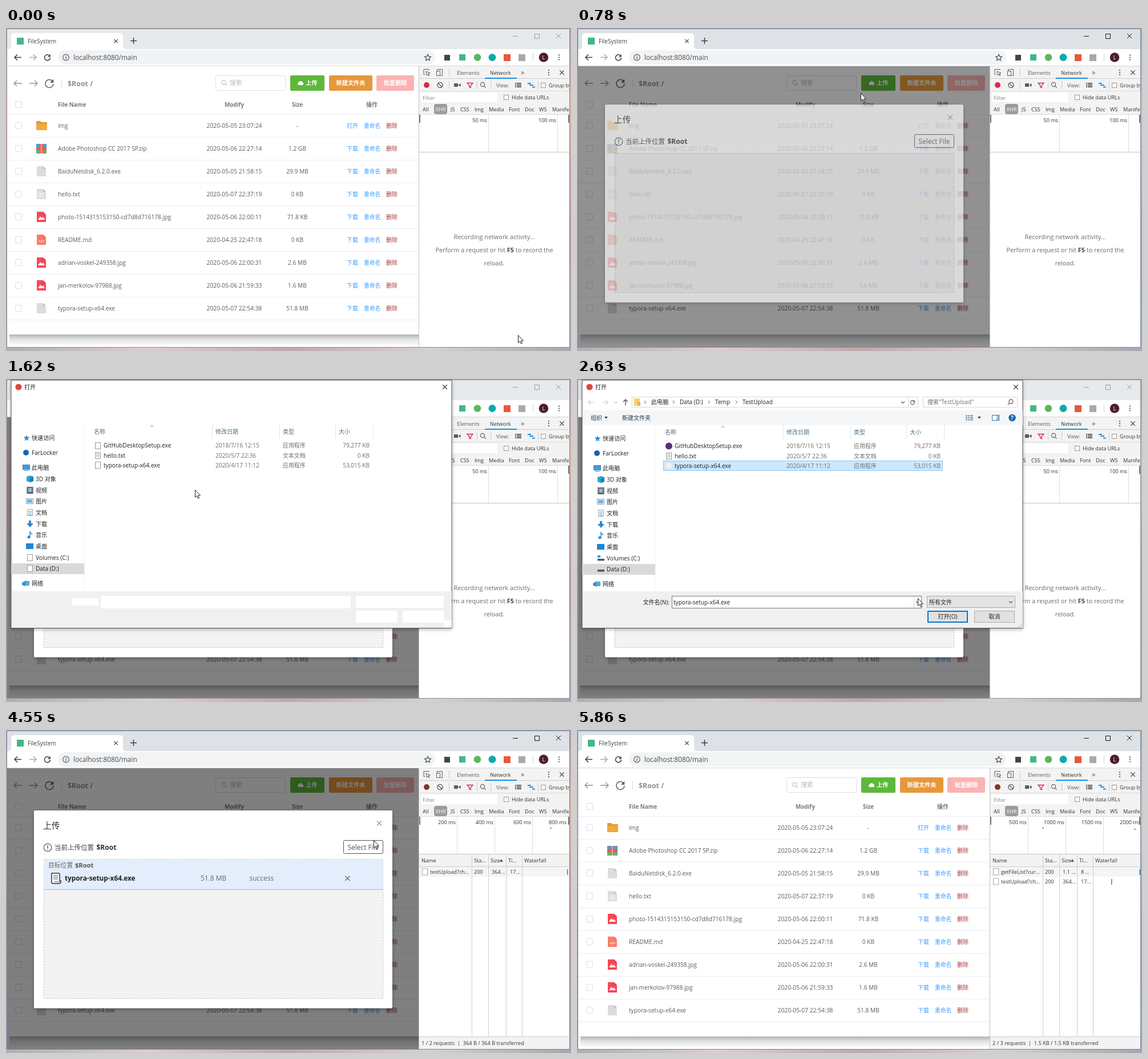
An HTML page for the animation above (5.95 s loop, 990x566 px).

```html
<!DOCTYPE html>
<html lang="zh">
<head>
<meta charset="utf-8">
<title>FileSystem</title>
<style>
html, body { margin: 0; width: 100%; height: 100%; overflow: hidden; background: #b9b2b6; }
svg { display: block; width: 100vw; height: 100vh; }
text { font-family: 'Open Sans', 'Noto Sans CJK SC', 'Noto Sans CJK', sans-serif; white-space: pre; }
</style>
</head>
<body>
<svg id="stage" viewBox="0 0 990 566" preserveAspectRatio="none"></svg>
<script>
const BOLD = 'font-weight="700"', MID = 'text-anchor="middle"', END = 'text-anchor="end"';
const text = (x, y, s, c = '#595c61', size = 10.2, extra = '') =>
  `<text x="${x}" y="${y}" fill="${c}" font-size="${size}" ${extra}>${s}</text>`;
const rect = (x, y, w, h, fill, extra = '') =>
  `<rect x="${x}" y="${y}" width="${w}" height="${h}" fill="${fill}" ${extra}/>`;
const box = (x, y, w, h, stroke, fill = '#fff', extra = '') =>
  rect(x + .5, y + .5, w - 1, h - 1, fill, `stroke="${stroke}" ${extra}`);
const path = (d, stroke, w = 1, fill = 'none', extra = '') =>
  `<path d="${d}" stroke="${stroke}" stroke-width="${w}" fill="${fill}" ${extra}/>`;
const disc = (x, y, r, fill, extra = '') => `<circle cx="${x}" cy="${y}" r="${r}" fill="${fill}" ${extra}/>`;
const ring = (x, y, r, stroke, w = 1) => disc(x, y, r, 'none', `stroke="${stroke}" stroke-width="${w}"`);
const cross = (x, y, r, c, w = 1) => path(`M${x - r} ${y - r}l${2 * r} ${2 * r}m0 ${-2 * r}l${-2 * r} ${2 * r}`, c, w);
const hline = (x, y, w, c) => rect(x, y, w, 1, c);
const vline = (x, y, h, c) => rect(x, y, 1, h, c);
const lens = (x, y, c, dir = 1) => ring(x, y, 3.6, c, 1.1) + path(`M${x + dir * 2.6} ${y + 2.6}l${dir * 3} 3`, c, 1.3);
const arrow = (x, y, len, c, dir, h = 5, w = 1.4) =>
  path(`M${x} ${y}h${dir * len}M${x + dir * h} ${y - h}l${-dir * h} ${h}l${dir * h} ${h}`, c, w);
const head = (x, y, len, c, dir, h = 5, w = 1.4) => {
  const tip = x + dir * len;
  return path(`M${x} ${y}H${tip}M${tip - dir * h} ${y - h}L${tip} ${y}l${-dir * h} ${h}`, c, w);
};
const dots = (x, y) => [-4, 0, 4].map(d => disc(x, y + d, 1.1, '#444')).join('');
const group = (id, body, extra = '') => `<g id="${id}" ${extra}>${body}</g>`;
const reload = (x, y, r, c, w) =>
  path(`M${x + r * .75} ${y - r * .6}A${r} ${r} 0 1 0 ${x + r} ${y + r * .1}`, c, w) +
  path(`M${x + r} ${y - r}v${r * .8}h${-r * .8}z`, c, .5, c);

const defs = `<defs>
<linearGradient id="wall" x2="0" y2="1"><stop stop-color="#aaa2a7"/><stop offset=".25" stop-color="#d8b3a8"/>
<stop offset=".6" stop-color="#b99a9c"/><stop offset="1" stop-color="#a9a6b2"/></linearGradient>
<linearGradient id="floor"><stop stop-color="#b3adb5"/><stop offset=".25" stop-color="#d9cfd0"/>
<stop offset=".5" stop-color="#c0a9aa"/><stop offset=".75" stop-color="#d6d0d5"/><stop offset="1" stop-color="#aaa5ae"/></linearGradient>
<linearGradient id="under" x2="0" y2="1"><stop stop-color="#b4b4b4"/><stop offset=".45" stop-color="#e2e2e2"/>
<stop offset="1" stop-color="#fcfcfc"/></linearGradient>
<filter id="shade" x="-5%" y="-5%" width="110%" height="115%"><feDropShadow dx="0" dy="2" stdDeviation="3" flood-opacity=".3"/></filter>
<clipPath id="win"><rect x="2" y="2" width="985" height="557"/></clipPath></defs>`;

function chrome() {
  const ink = '#3c4043';
  return rect(2, 2, 985, 557, '#fff') + rect(2, 2, 985, 35, '#e7eaed', 'id="strip"') +
    path('M3 37q6 0 6-6V15q0-6 6-6H199q6 0 6 6V31q0 6 6 6z', 'none', 0, '#fff') +
    rect(19, 17, 12, 12, '#41b883') + text(38, 27, 'FileSystem', ink, 10.1) + cross(192.5, 23, 3.2, ink, 1.2) +
    path('M218 22.5h11M223.5 17v11', ink, 1.5) +
    group('controls', path('M888 14.5h9M926.5 10.5h8v8h-8zM964 10l8 8m0-8l-8 8', 'currentColor')) +
    arrow(15, 51.5, 12, ink, 1, 5, 1.6) + head(41, 51.5, 12, '#a9abae', 1, 5, 1.6) + reload(72.5, 51.5, 5, ink, 1.6) +
    rect(91, 39, 661, 25, '#f1f3f4', 'rx="12.5"') + ring(105, 51.5, 5.3, '#5f6368', 1.2) +
    path('M105 48v1.4M105 50.6v3.8', '#5f6368', 1.4) + text(118, 55.5, 'localhost:8080/main', '#4a4d51', 11.8) +
    path('M739 46.3l1.6 3.6 3.9.4-2.9 2.6.8 3.8-3.4-2-3.4 2 .8-3.8-2.9-2.6 3.9-.4z', ink, 1.1) +
    rect(768, 47, 10, 10, '#444') + rect(794, 46, 11, 11, '#41b883') + disc(826, 51.5, 6.3, '#5bb75b') +
    disc(852, 51.5, 6.5, '#10a9a9') + rect(872, 46, 12, 12, '#e8573c') + rect(898, 46, 12, 12, '#a9a9a9') +
    vline(923, 44, 15, '#d5d7da') + disc(942, 51.5, 8.3, '#4b1f2b') + text(942, 55, 'L', '#fff', 9.5, MID) + dots(969, 51.5) +
    hline(2, 66, 985, '#d4d6d9');
}

const sheet = (y, c) => path(`M54 ${y - 9}h11l5 5v13h-16z`, 'none', 0, c) + path(`M65 ${y - 9}v5h5z`, 'none', 0, '#0002');
const icons = {
  dir: y => path(`M53 ${y - 7}q0-1 1-1h6l2 2h9q1 0 1 1v12q0 1-1 1h-17q-1 0-1-1z`, 'none', 0, '#e5982f') + rect(53, y - 3, 19, 11, '#f0a93f', 'rx="1"'),
  zip: y => rect(53, y - 8, 18, 6, '#4e9bd0') + rect(53, y - 2, 18, 5, '#e9584e') + rect(53, y + 3, 18, 6, '#57b27c') +
    rect(59, y - 8, 6, 17, '#f0625a') + path(`M62 ${y - 8}v17`, '#f6d9a0', 2, 'none', 'stroke-dasharray="1.5 1.5"'),
  exe: y => sheet(y, '#dcdcdc'),
  txt: y => sheet(y, '#dcdcdc') + path(`M57 ${y - 1}h10m-10 3h10m-10 3h10`, '#fff', 1.2),
  jpg: y => sheet(y, '#fa4655') + path(`M56 ${y + 5}l4-6 3 3 2-2 3 5z`, 'none', 0, '#fff'),
  md: y => sheet(y, '#fb7b66') + text(62, y + 4.5, '&lt;/&gt;', '#fff', 6.5, MID + ' ' + BOLD)
};
const files = [
  ['dir', 'img', '05-05 23:07:24', '-'],
  ['zip', 'Adobe Photoshop CC 2017 SP.zip', '05-06 22:27:14', '1.2 GB'],
  ['exe', 'BaiduNetdisk_6.2.0.exe', '05-05 21:58:15', '29.9 MB'],
  ['txt', 'hello.txt', '05-07 22:37:19', '0 KB'],
  ['jpg', 'photo-1514315153150-cd7d8d716178.jpg', '05-06 22:00:11', '71.8 KB'],
  ['md', 'README.md', '04-25 22:47:18', '0 KB'],
  ['jpg', 'adrian-voskel-249358.jpg', '05-06 22:00:31', '2.6 MB'],
  ['jpg', 'jan-merkolov-97988.jpg', '05-06 21:59:33', '1.6 MB'],
  ['exe', 'typora-setup-x64.exe', '05-07 22:54:38', '51.8 MB']
];

function page() {
  const check = y => box(16, y - 6, 12, 12, '#dcdfe6', '#fff', 'rx="1.5"');
  const title = '#77797f', strong = MID + ' ' + BOLD;
  let s = rect(2, 67, 721, 492, '#fdfdfd') + rect(6, 537, 717, 19, 'url(#under)') + rect(3, 67, 720, 470, '#fff') +
    arrow(14, 97, 14, '#909399', 1) + head(41, 97, 14, '#909399', 1) + reload(76, 97, 7, '#5a5d62', 1.5) +
    vline(97, 89, 16, '#dcdfe6') + text(108, 101.5, '$Root /', '#8d9096', 12.4, BOLD) +
    box(367, 83, 123, 27, '#dcdfe6', '#fff', 'rx="3"') + lens(381.5, 95.5, '#b9bdc5') + text(392, 100, '搜索', '#b4b8bf', 10.8) +
    rect(498, 83, 60, 27, '#5db83a', 'rx="2"') + rect(566, 83, 76, 27, '#e6983c', 'rx="2"') + rect(649, 83, 66, 27, '#fab3b3', 'rx="2"') +
    path('M513 100a2.6 2.6 0 0 1 .2-5a3.2 3.2 0 0 1 6 0a2.6 2.6 0 0 1 .3 5z', 'none', 0, '#fff') +
    text(525, 100.2, '上传', '#fff', 10.2, BOLD) + text(604, 100.2, '新建文件夹', '#fff', 10.2, strong) + text(682, 100.2, '批量删除', '#fff', 10.2, strong) +
    check(134) + text(91, 137.5, 'File Name', title, 9.9, BOLD) + text(400, 137.5, 'Modify', title, 9.9, strong) +
    text(510.5, 137.5, 'Size', title, 9.9, strong) + text(641, 137.5, '操作', title, 10, strong) + hline(3, 151, 720, '#ebeef5');
  files.forEach(([kind, name, date, size], k) => {
    const y = 171 + 40 * k, b = y + 3.7;
    s += check(y) + icons[kind](y) + text(91, b, name) + text(400, b, '2020-' + date, undefined, 10.25, MID) +
      text(510.5, b, size, undefined, 10.2, MID) + text(597, b, k ? '下载' : '打开', '#409eff', 10) +
      text(627, b, '重命名', '#409eff', 9.8) + text(666, b, '删除', '#aa383c', 10) + hline(3, y + 20, 720, '#ebeef5');
  });
  return s;
}

const G = '#5a5a5a', D = '#333', Z = 9.2;
const ruler = (marks, cap) => marks.map(([x, s]) => vline(x, 152, 65, '#ddd') + text(x - 2, 165, s, D, Z, END)).join('') + (cap || '');

function devtools() {
  const bar = '#f3f3f3', sep = '#ccc';
  const types = [['All', 730], ['JS', 779], ['CSS', 796], ['Img', 821], ['Media', 846], ['Font', 881], ['Doc', 909], ['WS', 934], ['Manifest', 957]];
  const row = (y, name, size, time, x) => box(729, y - 9.5, 10, 12, '#aaa') + text(743, y, name, D, Z) + text(820, y, '200', D, Z) +
    text(851, y, size, D, Z) + text(883, y, time, D, Z) + rect(x, y - 8, 1.6, 10, '#2a93cf');
  const status = s => text(728, 552, s, D, Z);
  const upload = 'testUpload?ch...';
  return rect(723, 67, 264, 492, '#fff') + rect(724, 67, 263, 84, bar) + vline(723, 67, 492, '#c4c4c4') + hline(724, 88, 263, sep) +
    path('M741 74v-1.5h-9v9h2M736 76l7 3-3 1.2 2 3-1 .7-2-3-2 2z', G) + path('M755.5 75v-2.5h9v11h-3M754.5 75.5h6v8h-6z', G) +
    vline(776, 71, 14, sep) + text(790, 81.5, 'Elements', G, Z) + text(848, 81.5, 'Network', D, Z) + rect(839, 87, 56, 2, '#1a8fe8') +
    text(902, 82, '»', G, 13) + dots(951, 78) + cross(974, 78, 3.7, G, 1.4) +
    disc(737, 100, 5, '#d92b45', 'id="rec"') + ring(760.5, 100, 4.6, G, 1.4) + path('M757.4 97l6.2 6', G, 1.4) + vline(776, 93, 14, sep) +
    path('M785 97h7v6h-7zM792.5 100l4-3v6z', 'none', 0, G) + path('M808 96.5h10l-3.8 4.2v4l-2.4-1.2v-2.8z', '#d92b45', 1.3) + vline(825, 93, 14, sep) +
    lens(835, 99, G) + vline(849, 93, 14, sep) + text(859, 103.5, 'View:', G, Z) + path('M892 97h2m1 0h8m-11 3h2m1 0h8m-11 3h2m1 0h8', G, 2) +
    path('M914 97h6m-3 3h7m-2 3.5h5', '#1a8fe8', 2) + vline(932, 93, 14, sep) + box(937, 96, 9, 9, '#999') + text(951, 103.5, 'Group by frame', D, Z) +
    hline(724, 110, 263, '#ddd') + rect(727, 113, 134, 17, '#fff') + text(730, 125.5, 'Filter', '#858585', Z) + box(872, 117, 9, 9, '#999') +
    text(886, 125, 'Hide data URLs', D, Z) + rect(750, 133, 23, 18, '#9b9b9b', 'rx="4"') + text(761.5, 145.5, 'XHR', '#fff', Z, MID) +
    types.map(([s, x]) => text(x, 145.5, s, D, Z)).join('') + hline(724, 151, 263, '#ddd') + hline(724, 217, 263, '#c4c4c4') +
    group('scale0', ruler([[845, '50 ms'], [966, '100 ms']])) +
    group('scale1', ruler([[790, '200 ms'], [856, '400 ms'], [922, '600 ms']], text(951, 165, '800 ms', D, Z) + rect(953, 171, 3, 1.5, '#1b9aaa'))) +
    group('scale2', ruler([[790, '500 ms'], [856, '1000 ms'], [922, '1500 ms']],
      text(951, 165, '2000 ms', D, Z) + rect(815, 171, 3, 1.5, '#1b9aaa') + rect(976, 173, 3, 1.5, '#1b9aaa'))) +
    rect(724, 152, 2, 14, '#777') + rect(985, 152, 2, 14, '#777') +
    group('idle', text(855.5, 370.4, 'Recording network activity...', '#6a6a6a', 10.9, MID) +
      text(855.5, 393.2, 'Perform a request or hit <tspan font-weight="700" fill="#444">F5</tspan> to record the', '#6a6a6a', 10.9, MID) +
      text(855.5, 416, 'reload.', '#6a6a6a', 10.9, MID)) +
    group('grid', rect(724, 218, 263, 21, bar) + rect(724, 240, 263, 17, '#f5f5f5') + hline(724, 239, 263, sep) +
      [816, 845, 876, 904].map(x => vline(x, 218, 319, '#ccc')).join('') + rect(724, 537, 263, 22, bar) + hline(724, 537, 263, sep) +
      [['Name', 728], ['Sta...', 820], ['Size', 849], ['Ti...', 880], ['Waterfall', 908]].map(([s, x]) => text(x, 232, s, D, Z)).join('') +
      path('M865 231l3-5 3 5z', 'none', 0, G)) +
    group('net1', status('0 / 1 requests  |  0 B / 0 B transferred')) +
    group('net2', row(252, upload, '364...', '17...', 983) + status('1 / 2 requests  |  364 B / 364 B transferred')) +
    group('net3', row(252, 'getFileList?cur...', '1.1 ...', '8 ...', 985.4) + row(269, upload, '364...', '17...', 936) +
      status('2 / 3 requests  |  1.5 KB / 1.5 KB transferred'));
}

function uploader() {
  return rect(49, 141, 628, 346.5, '#fff', 'rx="2" filter="url(#shade)"') + text(65, 172.5, '上传', '#303133', 14.8) +
    group('shut', cross(654, 163.5, 4, 'currentColor', 1.1)) + ring(73, 206, 6.8, '#444', 1.1) + path('M73 202v5M73 208.5v1.5', '#444', 1.3) +
    text(85, 209.5, '当前上传位置', '#444', 11.5) + text(158.5, 209.5, '$Root', '#303133', 12, BOLD) +
    box(591, 193, 70, 24, '#555', '#fff', 'rx="2"') + text(626, 209.5, 'Select File', '#555', 12, MID) +
    box(66, 226, 595, 245, '#c2c2c2', '#f3f3f3', 'stroke-dasharray="3 2"') +
    group('item', rect(66.5, 226.5, 594, 53, '#e3edfb', 'id="done"') + text(74, 240.5, '目标位置', '#666', 10.8) +
      text(121, 240.5, '$Root', '#555', 11.1, BOLD) + hline(66, 279, 595, '#b9b9b9') +
      path('M80 251h12q2 0 2 2v11h2v2q0 3-3 3h-11q-2 0-2-2z', '#333', 1.5, '#fff') + path('M83 255h8m-8 3h8m-8 3h8M84 266h11', '#555') +
      text(103, 264, 'typora-setup-x64.exe', '#222', 11.8, BOLD) + text(341, 264, '51.8 MB', '#666', 11.9) +
      text(426.5, 264, '', '#666', 12, 'id="state"') + group('drop', cross(598.5, 260, 4, '#666', 1.3)));
}

function picker() {
  const side = [[104, '快速访问', '#2f8fd8'], [130, 'FarLocker', '#1464b4'], [156, '此电脑', '#3f9be0'], [176, '3D 对象', '#2aa6d8'],
    [196, '视频', '#56606a'], [215, '图片', '#6fb3e0'], [235, '文档', '#8aa9c4'], [255, '下载', '#2f86d6'], [274, '音乐', '#2f86d6'],
    [294, '桌面', '#1c87d8'], [314, 'Volumes (C:)', 0], [333, 'Data (D:)', 0], [359, '网络', '#3d8fcd']];
  const glyph = (n, y, c) => [
    () => path(`M36 ${y - 5}l1.4 3.6 4 .2-3 2.6 1 3.8-3.4-2-3.4 2 1-3.8-3-2.6 4-.2z`, 'none', 0, c),
    () => disc(35, y, 5, c),
    () => box(29, y - 5, 13, 9, '#4a7da8', c) + hline(31, y + 5, 9, '#4a7da8'),
    () => path(`M36 ${y - 4}l6-2 6 2v8l-6 2-6-2z`, 'none', 0, c) + path(`M42 ${y - 1}l6-3v8l-6 2z`, 'none', 0, '#1d7fae'),
    () => rect(36, y - 6, 12, 12, c) + path(`M37 ${y - 5}v10m10-10v10`, '#fff', 1, 'none', 'stroke-dasharray="1.5 1.5"') + rect(39, y - 4, 6, 7, '#9fb8c9'),
    () => box(35, y - 5, 13, 10, '#8aa0b2') + rect(37, y - 3, 9, 6, c),
    () => box(37, y - 6, 10, 12, c) + path(`M39 ${y - 2}h6m-6 3h6m-6 3h6`, '#4b8fc5'),
    () => path(`M40 ${y - 6}h4v5h4l-6 7-6-7h4z`, 'none', 0, c),
    () => disc(40, y + 4, 2.5, c) + path(`M42 ${y + 4}v-10q0 3 4 5`, c, 1.5),
    () => rect(35, y - 5, 13, 10, c),
    () => '', () => '',
    () => path(`M28 ${y - 1}l7-4v10l-7-2z`, 'none', 0, c) + rect(34, y - 4, 7, 8, '#5aa9de')
  ][n]();
  const K = '#222', W = '#6d6d6d', H = '#4d7185';
  const list = [['GitHubDesktopSetup.exe', '2018/7/16 12:15', '应用程序', '79,277 KB'],
    ['hello.txt', '2020/5/7 22:36', '文本文档', '0 KB'], ['typora-setup-x64.exe', '2020/4/17 11:12', '应用程序', '53,015 KB']];
  const crumb = [['此电脑', 130], ['Data (D:)', 180], ['Temp', 242], ['TestUpload', 290]];
  const chev = (x, y, c) => path(`M${x - 3} ${y - 1.5}l3 3 3-3`, c, 1.1);
  const blank = y => box(156, y - 6, 10, 12, '#999');
  let body = rect(9, 324, 128, 19, '#d9d9d9') + side.map(([y, s, c], n) =>
    glyph(n, y, c) + text(n < 3 || n == 12 ? 45 : 52, y + 3.6, s, K, 10.1)).join('');
  body += rect(151.5, 143.5, 489, 17, '#cce8ff', 'id="pick" stroke="#90c8f0"');
  body += [['名称', 154], ['修改日期', 367], ['类型', 485], ['大小', 583]].map(([s, x]) => text(x, 96.5, s, H, 10)).join('') +
    [361, 479, 577, 643].map(x => vline(x, 81, 24, '#e3e3e3')).join('') + path('M252.5 85l3-3 3 3', '#777');
  list.forEach(([name, date, kind, size], k) => {
    const y = 121.4 + 17.3 * k;
    body += text(171, y, name, K, 10.1) + text(367, y, date, W) + text(485, y, kind, W, 9.9) + text(637, y, size, W, 10.1, END);
  });
  body += blank(135) + path('M158 132h6m-6 2.5h6m-6 2.5h6', '#888', .8) +
    group('plain', blank(118) + blank(152) + box(37, 308, 10, 12, '#999') + box(37, 327, 10, 12, '#999')) +
    group('rich', disc(161, 117.5, 6, '#5b2a78') + rect(156.5, 147.5, 9, 9, '#f2f2f2') +
      [314, 333].map(y => rect(36, y + 1, 12, 3.5, '#555')).join('') + rect(36, 309, 5, 4, '#2f9be0'));
  const ready = arrow(20, 41, 10, '#ccc', 1, 3.5, 1.2) + head(44, 41, 10, '#ccc', 1, 3.5, 1.2) + chev(68, 41, '#ccc') +
    path('M85 46v-10m-4 4l4-4 4 4', '#555', 1.4) + box(96, 31, 502, 19, '#d9d9d9') + rect(100, 34, 10, 13, '#f7cf72') + rect(106, 40, 5, 7, '#eab545') +
    crumb.map(([s, x]) => path(`M${x - 12} 38l2.5 2.5-2.5 2.5`, '#555') + text(x, 44, s, K, 10.1)).join('') + chev(571, 41, '#555') +
    vline(580, 32, 17, '#ddd') + reload(588, 41, 3.6, '#555', 1.1) + box(606, 31, 166, 19, '#d9d9d9') + text(614, 44, '搜索"TestUpload"', W, 10.1) +
    lens(760.5, 39.5, '#555', -1) + rect(10, 55, 771, 26, '#f5f6f7') + text(24, 72, '组织', '#1e395b', 10) + path('M48 66h6l-3 3.5z', 'none', 0, '#1e395b') +
    text(79, 72, '新建文件夹', '#1e395b', 10) + path('M681 64.5h3m1 0h3m1 0h5M681 68h3m1 0h3m1 0h5M681 71.5h3m1 0h3m1 0h5', '#7a8b9c', 2) +
    path('M702 66h6l-3 3.5z', 'none', 0, '#1e395b') + box(727, 63, 13, 10, '#3a6ea5') + rect(735, 64, 4, 8, '#8fc4ec') +
    disc(762.5, 68, 6.2, '#1464b4') + text(762.5, 71.5, '?', '#fff', 10, MID + ' ' + BOLD) +
    text(162, 394.5, '文件名(N):', K, 10.1, END) + box(166, 380, 438, 22, '#7a7a7a') + text(169, 395, '', K, 10.1, 'id="fname"') +
    vline(590, 381, 20, '#b9d9f0') + chev(597, 391, '#444') + box(613, 380, 155, 21, '#adadad', '#e3e3e3') + text(617, 394.5, '所有文件', K, 10) + chev(760, 391, '#555') +
    rect(615, 407, 69, 19, '#e1e1e1', 'stroke="#0078d7" stroke-width="2"') + text(649.5, 420, '打开(O)', K, 10.1, MID) +
    box(696, 406, 71, 21, '#adadad', '#e1e1e1') + text(731.5, 420, '取消', K, 10, MID) +
    path('M778 430v5m-3-2.5v2.5m-3-1v1', '#aaa', 1.5, 'none', 'stroke-dasharray="1.5 1"');
  const bare = [[115, 384, 47, 13], [166, 380, 438, 22], [613, 380, 154, 21], [613, 406, 73, 21], [695, 406, 73, 21], [767, 423, 14, 13]];
  return rect(9, 2, 772, 434.5, '#fff', 'stroke="#555" filter="url(#shade)"') + rect(10, 372, 771, 64, '#f0f0f0') + vline(137, 82, 290, '#f4f4f4') +
    disc(22, 14, 5.6, '#e0483a') + text(32, 18, '打开', K, 10) + cross(769, 14, 3.8, K, 1.2) +
    group('listing', body) + group('bare', bare.map(b => rect(...b, '#fff')).join('')) + group('ready', ready);
}

const stage = document.getElementById('stage');
stage.innerHTML = defs + rect(0, 0, 990, 566, 'url(#wall)') + rect(0, 559, 990, 7, 'url(#floor)') +
  rect(1.5, 1.5, 986, 558, '#fff', 'id="frame" stroke="#8d9097"') +
  group('app', chrome() + page() + rect(2, 67, 721, 492, '#000', 'id="veil"') + group('upload', uploader()) + devtools(), 'clip-path="url(#win)"') +
  group('picker', picker()) +
  group('mouse', path('M.5.5v13l3-2.8 2 4.6 2-.9-2-4.4h4z', '#222', 1, '#fff'));

const el = id => document.getElementById(id);
const show = (id, on) => el(id).style.display = on ? '' : 'none';
const set = (id, key, value) => el(id).setAttribute(key, value);

const LOOP = 5950, TICKS = 77, STEP = LOOP / TICKS;
const OPEN = 658, CLOSE = 5040;
const clamp = v => Math.min(1, Math.max(0, v));

// cubic-bezier(.25, .1, .25, 1)
function ease(x) {
  let a = 0, b = 1;
  const curve = (p, q, u) => 3 * p * u * (1 - u) ** 2 + 3 * q * u * u * (1 - u) + u ** 3;
  for (let n = 0; n < 20; n++) {
    const m = (a + b) / 2;
    if (curve(.25, .25, m) < x) a = m; else b = m;
  }
  return x <= 0 ? 0 : x >= 1 ? 1 : curve(.1, 1, a);
}

// tick, x, y
const route = [[0, 897, 538], [6, 515, 103], [8, 510, 100], [10, 497, 114], [15, 622, 198], [18, 622, 198], [21, 331, 194],
  [24, 331, 194], [27, 262, 150], [29, 262, 150], [33, 590, 378], [34, 597, 384], [36, 646, 412], [37, 646, 412], [41, 553, 403],
  [53, 553, 403], [61, 661, 154], [64, 655, 158], [65, 655, 158], [66, 671, 188], [69, 786, 518], [70, 850, 535], [71, 974, 550], [77, 990, 570]];

function pointer(i) {
  const k = Math.max(1, route.findIndex(p => p[0] >= i)), a = route[k - 1], b = route[k];
  const u = clamp((i - a[0]) / (b[0] - a[0])), s = u * u * (3 - 2 * u);
  return [a[1] + (b[1] - a[1]) * s, a[2] + (b[2] - a[2]) * s];
}

function draw(i) {
  const t = i * STEP, picking = i >= 20 && i < 38, loaded = i >= 22, chosen = i >= 28;
  const active = i >= 7 && i < 20 || i >= 38 && i < 76;
  set('strip', 'fill', active ? '#dee1e6' : '#e7eaed');
  set('frame', 'stroke', active ? '#6f8ba3' : '#8d9097');
  el('controls').style.color = active ? '#111' : '#999';

  const shown = span => ease((t - OPEN) / span) - ease((t - CLOSE) / span);
  const fade = shown(300);
  set('veil', 'opacity', .5 * shown(200));
  set('upload', 'opacity', fade);
  set('upload', 'transform', `translate(0 ${-20 * (1 - fade)})`);
  show('item', i >= 41);
  show('done', i >= 51);
  show('drop', i >= 51);
  el('state').textContent = i >= 51 ? 'success' : `校验MD5 ${Math.min(100, Math.max(0, Math.round((i - 41) * 11.17)))}%`;
  el('shut').style.color = i >= 61 ? '#409eff' : '#909399';

  show('picker', picking);
  show('ready', loaded);
  show('rich', loaded);
  show('plain', !loaded);
  show('bare', !loaded);
  show('pick', chosen);
  set('listing', 'transform', `translate(0 ${loaded ? 0 : -1})`);
  el('fname').textContent = chosen ? 'typora-setup-x64.exe' : '';

  const net = i < 41 ? 0 : i < 50 ? 1 : i < 65 ? 2 : 3;
  set('rec', 'fill', i < 38 ? '#d92b45' : '#7d3a1e');
  show('idle', net == 0);
  show('grid', net > 0);
  for (const n of [1, 2, 3]) show('net' + n, net == n);
  show('scale0', net < 2);
  show('scale1', net == 2);
  show('scale2', net == 3);

  show('mouse', i < 72);
  set('mouse', 'transform', `translate(${pointer(i).map(Math.round).join(' ')})`);
}

let start = null, last = -1;
function tick(now) {
  if (start === null) start = now;
  const i = Math.floor(((now - start) % LOOP) / STEP + .14) % TICKS;
  if (i !== last) draw(last = i);
  requestAnimationFrame(tick);
}
draw(0);
requestAnimationFrame(tick);
</script>
</body>
</html>
```
